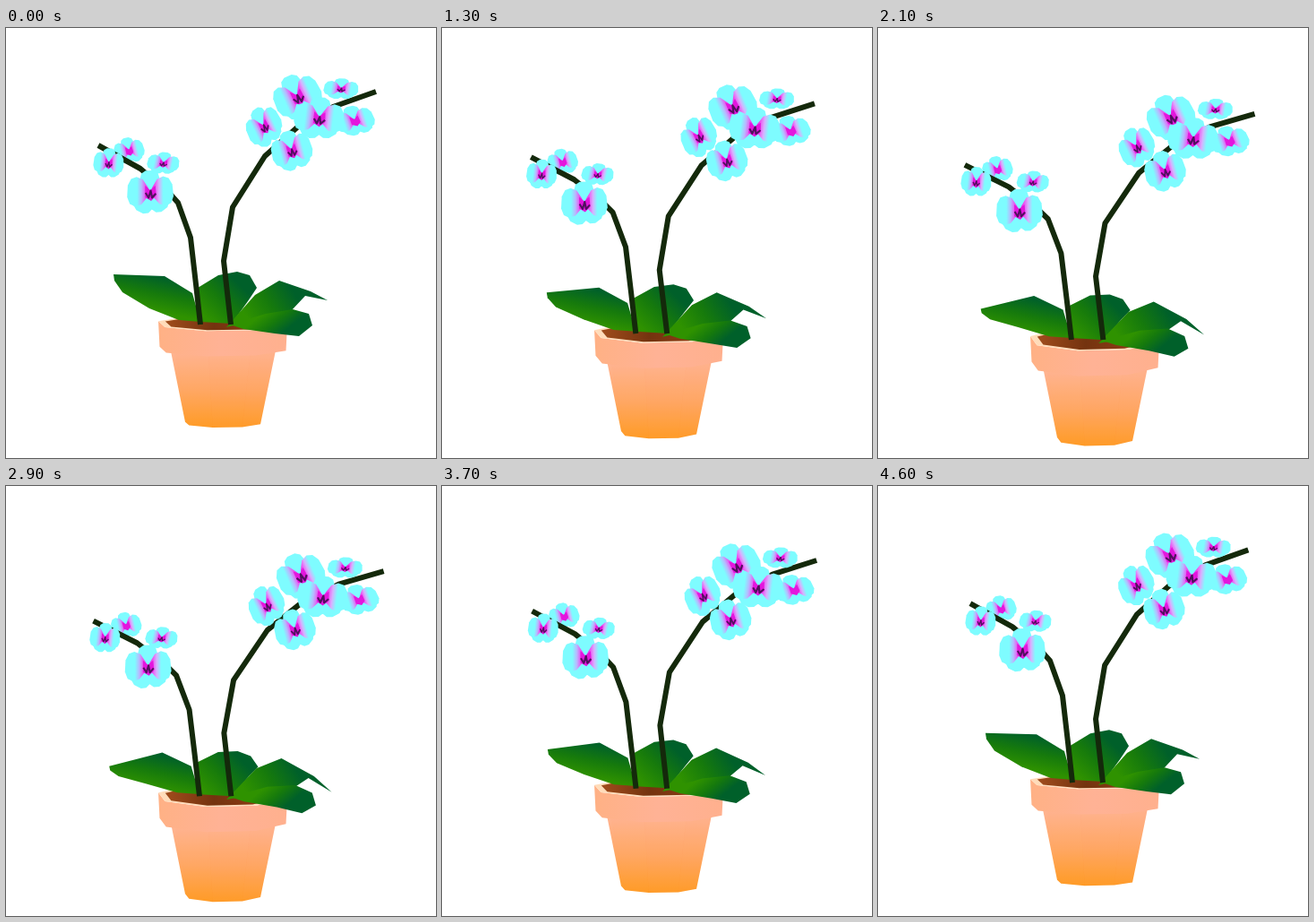
Recreate the animation shown at these times as an HTML page with a canvas. Size 480 by 480 pixels, loop 4.7 s.

```html
<!DOCTYPE html>
<html lang="en">
<head>
<meta charset="utf-8">
<title>Orchid</title>
<style>
  html, body { margin: 0; width: 100%; height: 100%; overflow: hidden; background: #fff; }
  canvas { display: block; width: 480px; height: 480px; }
</style>
</head>
<body>
<canvas id="stage" width="480" height="480"></canvas>
<script>
const ctx = document.getElementById('stage').getContext('2d');
const LOOP = 4700, STEP = 100, CENTER = 242;
const DROP = 18.5, SPREAD = .045;
const CYAN = '#7efcff';
let tilt = 0, sway = 0;

const leaves = [
  { base: [232, 330], reach: 9, light: [222, 322], shade: [258, 284],
    edge: [[217,328], [214,290], [237,276], [258,272], [272,276], [280,290], [270,305], [252,330]] },
  { base: [217, 328], reach: 21, light: [176, 318], shade: [184, 280],
    edge: [[217,328], [208,296], [177,277], [120,275], [121,282], [130,295], [160,313], [193,326]] },
  { base: [252, 330], reach: 21, light: [268, 322], shade: [318, 290],
    edge: [[246,334], [278,298], [305,282], [340,294], [359,304], [334,299], [318,316]] },
  { base: [252, 330], reach: 8, light: [285, 320], shade: [304, 344],
    edge: [[250,331], [290,319], [320,314], [338,319], [342,332], [327,344], [300,341], [265,336]] }
];

const stems = {
  left: { rise: 5, lag: 0, joints: [[217,331], [212,286], [206,234], [192,195], [183,185], [150,157], [103,131]] },
  right: { rise: 8, lag: 2, joints: [[251,331], [243,260], [253,200], [289,143], [325,111], [365,88], [413,71]] }
};

const LEFT = { drop: 21.5, spread: .04, lagX: .4 };
const RIGHT = { drop: 23.5, spread: .02, lagX: 2.3, lagY: 3 };

// Each blossom: centre x, y, half width, half height, turn
const backRow = [
  [LEFT, 137.5, 137, 17, 15, -.2],
  [RIGHT, 389.5, 103.5, 22, 17, -.25]
];
const frontRow = [
  [LEFT, 114.5, 151, 17, 17, .1],
  [LEFT, 175.5, 151, 18, 12.5, .15],
  [LEFT, 161, 183.5, 26, 25, 0],
  [RIGHT, 374, 68, 19.5, 12, .1],
  [RIGHT, 325.5, 77, 27, 26, -.4],
  [RIGHT, 288, 110, 20, 23, -.5],
  [RIGHT, 349.5, 101, 28, 24, .1],
  [RIGHT, 319, 137, 23, 23, -.25]
];

function place([x, y], { drop = DROP, spread = SPREAD, lagX = 0, lagY = 0 }) {
  return [x + (x - CENTER) * spread * tilt - lagX * sway, y + drop * tilt - lagY * sway];
}

function trace(points) {
  ctx.beginPath();
  points.forEach(([x, y]) => ctx.lineTo(x, y));
}

function fill(points, style) {
  trace(points);
  ctx.closePath();
  ctx.fillStyle = style;
  ctx.fill();
}

function blend(from, to, colors) {
  const g = ctx.createLinearGradient(...from, ...to);
  colors.forEach((c, i) => g.addColorStop(i / (colors.length - 1), c));
  return g;
}

// Corners of an eight-sided hoop; the first five face the viewer
function hoop(y, radius) {
  return Array.from({ length: 8 }, (_, i) => {
    const a = (-105 + i * 45) * Math.PI / 180;
    return [CENTER + radius * Math.sin(a),
      y + DROP * tilt + radius * (.12 + .06 * tilt) * Math.cos(a)];
  });
}

function wall(top, bottom, style) {
  fill([...top.slice(0, 5), ...bottom.slice(0, 5).reverse()], style);
}

function drawPot() {
  const brim = hoop(329.5, 74.5), collar = hoop(358, 73), neck = hoop(356, 61.5), foot = hoop(441, 43.5);
  wall(neck, foot, blend(neck[2], [neck[2][0], foot[2][1]], ['#ffb38f', '#ffa763', '#ff9b24']));
  for (let i = 0; i < 4; i++)
    fill([neck[i], neck[i + 1], foot[i + 1], foot[i]], `rgba(255,150,100,${i * .03})`);
  wall(brim, collar, blend(brim[0], brim[4], ['#ffb185', '#ffb295', '#ffb08e']));
  fill(brim, '#ffdcba');
  fill(hoop(329.5, 66.5), blend([178, 0], [286, 0], ['#a04c1c', '#74330f', '#8f3c14']));
}

function drawLeaf({ base, reach, light, shade, edge }) {
  const span = ([x, y]) => Math.hypot(x - base[0], y - base[1]);
  const length = Math.max(...edge.map(span));
  const points = edge.map(p => {
    const bend = reach * (span(p) / length) ** 3;
    return place(p, { drop: DROP + bend, lagY: bend * .17 });
  });
  const ends = [light, shade].map(p => place(p, { drop: DROP + reach * .3 }));
  fill(points, blend(...ends, ['#2f9200', '#167a0c', '#00602a']));
}

function drawStem({ rise, lag, joints }) {
  trace(joints.map((p, i) => {
    const u = i / (joints.length - 1);
    return place(p, { drop: DROP - 1 + rise * u * u, lagX: lag * u, lagY: lag * u });
  }));
  ctx.lineJoin = 'round';
  ctx.lineWidth = 6;
  ctx.strokeStyle = '#14290b';
  ctx.stroke();
}

// Faceted petal from the heart outwards
function petal(angle, length, width, style) {
  const side = [[.12, .35], [.35, .85], [.62, 1], [.85, .85], [.98, .4]];
  const c = Math.cos(angle), s = Math.sin(angle);
  const edge = [[0, 0], ...side, ...side.map(([u, v]) => [u, -v]).reverse()];
  fill(edge.map(([u, v]) => [u * length * c - v * width * s, u * length * s + v * width * c]), style);
}

function drawFlower([group, x, y, w, h, turn], throat) {
  ctx.save();
  ctx.translate(...place([x, y], group));
  ctx.scale(w, h);
  ctx.rotate(turn);
  [-1.6, 2.05, .9].forEach(a => petal(a, 1, .42, CYAN));
  const band = blend([-.75, 0], [.75, 0],
    [CYAN, CYAN, '#b8b8ff', '#ee4cf0', '#e010dc', '#ee4cf0', '#d8b0ff', CYAN, CYAN]);
  petal(Math.PI + .05, 1, .66, band);
  petal(-.1, 1, .66, band);
  fill([[-.22, -.3], [0, -.1], [.22, -.3], [.26, .14], [.04, .38], [-.22, .22]], '#e316dd');
  if (throat) {
    trace([[-.2, .02], [-.07, .24], [.02, -.08], [.08, .24], [.24, .05]]);
    ctx.strokeStyle = '#51105f';
    ctx.lineWidth = .08;
    ctx.stroke();
  }
  ctx.restore();
}

function draw(ms) {
  const angle = ms / LOOP * Math.PI * 2;
  tilt = (1 - Math.cos(angle)) / 2;
  sway = Math.sin(angle) - .33 * tilt;
  ctx.clearRect(0, 0, 480, 480);
  drawPot();
  leaves.forEach(drawLeaf);
  backRow.forEach(f => drawFlower(f, false));
  drawStem(stems.left);
  drawStem(stems.right);
  frontRow.forEach(f => drawFlower(f, true));
}

function tick() {
  const ms = performance.now() % LOOP;
  draw(Math.floor(ms / STEP) * STEP);
  requestAnimationFrame(tick);
}
tick();
</script>
</body>
</html>
```
